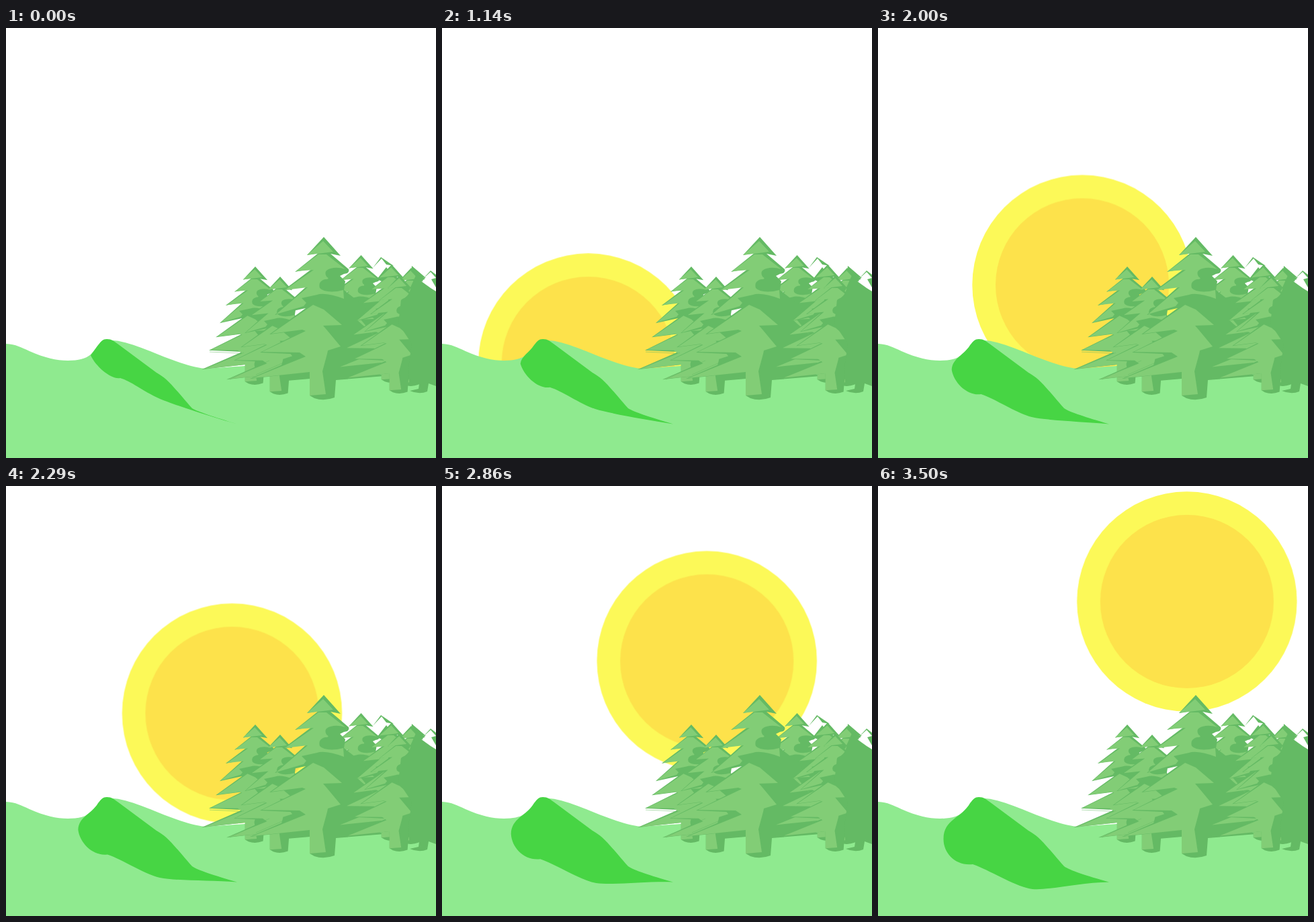
Write an HTML page without scripts that moves like this. It is 640x640 px and loops after 3.57 s.

```html
<!DOCTYPE html>
<html lang="en">
<head>
<meta charset="utf-8">
<title>Sunrise over the forest</title>
<style>
  html, body { margin: 0; width: 100%; height: 100%; overflow: hidden; background: #fff; }
  svg { display: block; width: 100%; height: 100%; }
  .dark { fill: #64ba64; }
  .lit { fill: #82cd76; }

  /* 50 ticks per loop, 2% each */
  .sun, .slope { animation: rise 3.57s -4ms infinite; }
  .slope { animation-name: grow; fill: #47d544; }

  @keyframes rise {
    0%   { transform: translate(99px, 662px); animation-timing-function: steps(8); }
    16%  { transform: translate(160px, 577px); animation-timing-function: steps(3); }
    22%  { transform: translate(181px, 549px); animation-timing-function: steps(10); }
    42%  { transform: translate(254.5px, 449.5px); animation-timing-function: steps(7); }
    56%  { transform: translate(304px, 382.5px); animation-timing-function: steps(4); }
    64%  { transform: translate(336.5px, 338.5px); animation-timing-function: steps(8); }
    80%  { transform: translate(394.3px, 260.5px); animation-timing-function: steps(9); }
    98%, 100% { transform: translate(459.8px, 172px); }
  }
  @keyframes grow {
    0% {
      d: path("M137 472C142 466 144 463 150 463C158 463 160 466 166 470L224 513C240 522 245 529 277 566C285 571 310 579 344 589.5C310 580 250 561 227 551C205 541 185 525 170 521C158 524 134 505 126 487C128 485 133 477 137 472Z");
      animation-timing-function: steps(49);
    }
    98%, 100% {
      d: path("M137 472C142 466 144 463 150 463C158 463 160 466 166 470L224 513C240 522 245 529 277 566C285 572 310 580 344 589.5C300 590 255 602 230 600C205 597 165 571 141 563C115 566 97 546 97.5 525C97.5 496 125 494 137 472Z");
    }
  }
</style>
</head>
<body>
<svg viewBox="0 0 640 640">
  <defs>
    <!-- tip of the tree at 0,0 -->
    <path id="shade" class="dark" d="M0 0L25 28L10 25L37 48Q39 54 30 55L24 58L32 66L30 79L62 104L64 121L50 124L87 157L58 158L102 200L80 203L90 207L18 213L16 239Q0 245 -14 240L-21 236V201L-110 211L-27 175L-95 172L-27 138L-81 145L-27 106L-73 116L-25 73L-61 80L-17 47L-43 52L-8 24L-25 27Z"/>
    <g id="tree">
      <use href="#shade"/>
      <g class="lit">
        <path d="M-1 6L14 22L-25 27Z"/>
        <path d="M-8 26L4 26L32 48Q20 44 10 47Q-1 50 4 59Q10 63 2 63Q-9 66 -6 76Q0 83 20 81L29 79L30 92Q2 82 -10 86L-33 91L-26 98L-30 103L-71 115L-24 75L-58 79L-15 49L-41 51Z"/>
        <path d="M-26 108L-16 101L0 108L27 131L-1 132L5 139L25 163L6 169L5 174L-2 200L3 234L-21 236V201L-106 210L-27 178L-36 172L-92 171L-27 140L-32 138L-78 144Z"/>
      </g>
    </g>
  </defs>

  <g class="sun">
    <circle r="163.7" fill="#fcf958"/>
    <circle r="129" fill="#fde24b"/>
  </g>

  <path fill="#8fea8f" d="M0 470C15 471 22 475 35 481C58 491 75 495 92 495C108 495 119 492 126 486L143 466L155 465C188 463 252 503 297 507L355 503L400 500H640V640H0Z"/>
  <path class="slope" d="M137 472C142 466 144 463 150 463C158 463 160 466 166 470L224 513C240 522 245 529 277 566C285 571 310 579 344 589.5C310 580 250 561 227 551C205 541 185 525 170 521C158 524 134 505 126 487C128 485 133 477 137 472Z"/>

  <path class="dark" d="M558 341L577 354L566 352L559 343L546 357ZM566 356L552 374L590 390ZM632 361L641 368V388L633 374L640 372L632 363L620 374ZM604 354L625 372L612 371L630 388L600 392Z"/>
  <use href="#tree" transform="translate(603 357) scale(.726)"/>
  <use href="#tree" transform="translate(528.5 338) scale(.726)"/>
  <use href="#tree" transform="translate(371 355) scale(.726)"/>
  <use href="#tree" transform="translate(408 370) scale(.726)"/>
  <use href="#tree" transform="translate(473 311)"/>
  <use href="#tree" transform="translate(574 352) scale(.726)"/>
  <use href="#tree" transform="translate(586 368) scale(.726)"/>
  <path class="dark" d="M588 405Q602 398 602 386L611 366L624 373L618 377L632 387L640 392V533L629 529L627 541Q615 546 601 540L614 537L615 530L601 533L598 512L604 470L584 440Z"/>
  <path fill="none" stroke="#64ba64" stroke-width=".5" d="M303 482L346 484M296 507L354 483M333 523L392 495M372 516L436 488"/>
</svg>
</body>
</html>
```
